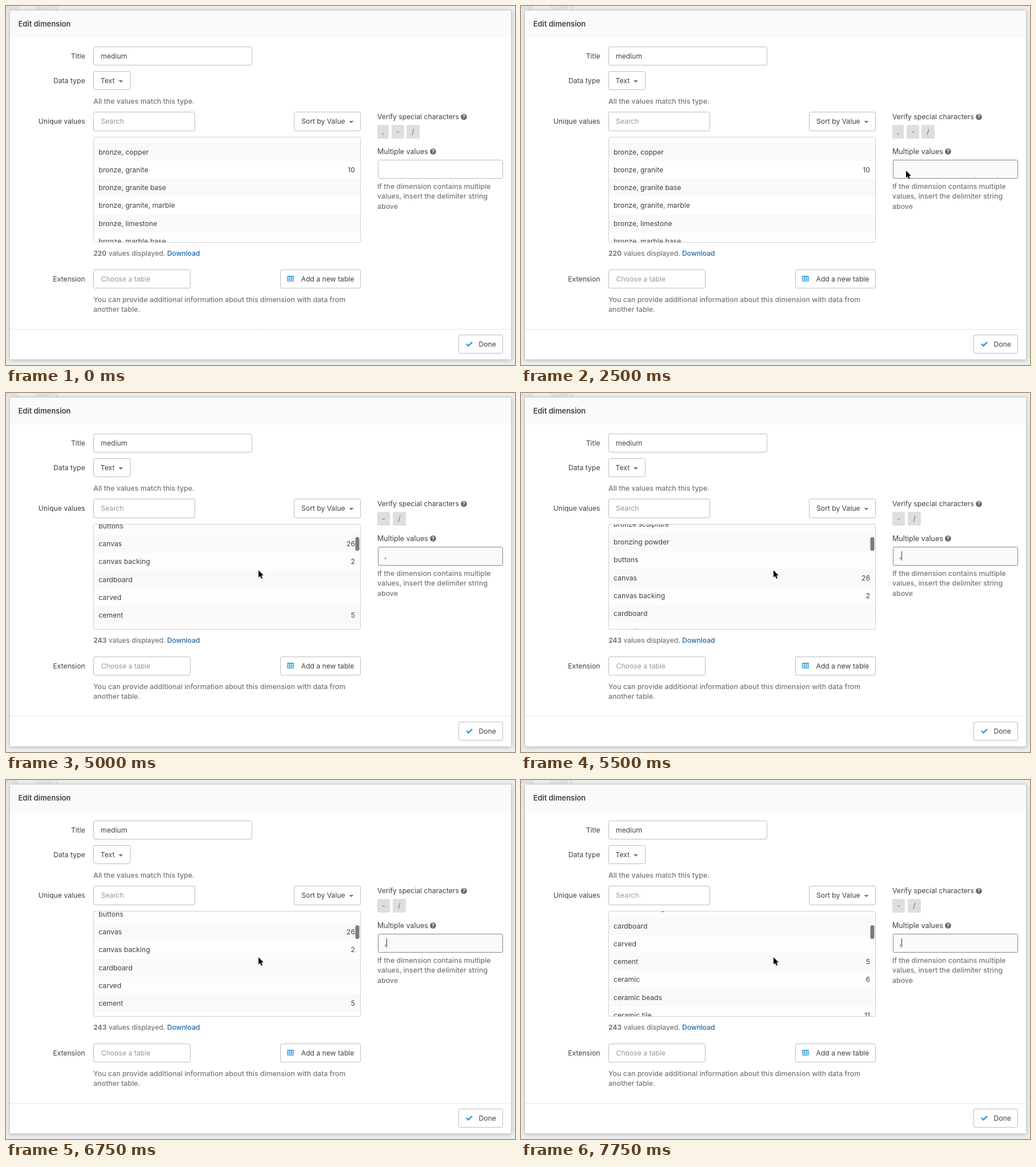
Write an HTML page with a canvas that moves like this. It is 891 px wide and 628 px high and loops after 8000 ms.

```html
<!DOCTYPE html>
<html lang="en">
<head>
<meta charset="utf-8">
<title>Edit dimension</title>
<style>
html, body { margin: 0; width: 100%; height: 100%; overflow: hidden; background: #ededed; }
canvas { display: block; }
</style>
</head>
<body>
<canvas id="stage" width="891" height="628"></canvas>
<script>
const ctx = document.getElementById('stage').getContext('2d');
const LOOP = 8000, TICK = 250, ROW = 31.25;
const INK = '#414141', HINT = '#999', LINE = '#bdbdbd', BLUE = '#3c9fdb';
const NOTE = { color: '#777', weight: 500, size: 12.35 };

const before = [['bronze, cast'], ['bronze, copper'], ['bronze, granite', '10'],
  ['bronze, granite base'], ['bronze, granite, marble'], ['bronze, limestone'],
  ['bronze, marble base']];
const after = [['bronze sculpture'], ['bronzing powder'], ['buttons'], ['canvas', '26'],
  ['canvas backing', '2'], ['cardboard'], ['carved'], ['cement', '5'],
  ['ceramic', '6'], ['ceramic beads'], ['ceramic tile', '11']];

// Keys are [time, ...values], joined by straight lines
const pointer = [[250, 693, 155], [500, 690, 336], [750, 684, 310], [1000, 684, 292],
  [1500, 684, 290], [1750, 678, 289], [2000, 674, 288], [3750, 674, 288],
  [4000, 610, 294], [4250, 500, 306], [4500, 442, 310]];
const scroll = [[4750, 236], [5000, 264], [5250, 302], [5500, 323.7], [6000, 326],
  [6250, 322], [6750, 266], [7250, 206.8], [7500, 197], [7750, 193]];

function at(keys, t) {
  if (t <= keys[0][0]) return keys[0].slice(1);
  for (let i = 1; i < keys.length; i++) {
    const a = keys[i - 1], b = keys[i];
    if (t <= b[0]) {
      const p = (t - a[0]) / (b[0] - a[0]);
      return a.slice(1).map((v, n) => v + (b[n + 1] - v) * p);
    }
  }
  return keys[keys.length - 1].slice(1);
}

function text(s, x, y, { color = INK, size = 12.2, weight = 400, align = 'left' } = {}) {
  ctx.font = `${weight} ${size}px Inter, Roboto, sans-serif`;
  ctx.fillStyle = color;
  ctx.textAlign = align;
  ctx.fillText(s, x, y);
  return x + ctx.measureText(s).width;
}

function fill(color, x, y, w, h, r = 0) {
  ctx.fillStyle = color;
  ctx.beginPath();
  ctx.roundRect(x, y, w, h, r);
  ctx.fill();
}

function box(x, y, w, h, line = LINE, back = '#fff') {
  fill(back, x, y, w, h, 2);
  ctx.strokeStyle = line;
  ctx.lineWidth = 1;
  ctx.beginPath();
  ctx.roundRect(x + .5, y + .5, w - 1, h - 1, 2);
  ctx.stroke();
}

function poly(points, color) {
  ctx.beginPath();
  points.forEach(([x, y]) => ctx.lineTo(x, y));
  ctx.closePath();
  ctx.fillStyle = color;
  ctx.fill();
}

const arrow = (x, y) => poly([[x - 4, y - 2], [x + 4, y - 2], [x, y + 2]], '#777');

function help(x, y) {
  ctx.beginPath();
  ctx.arc(x, y, 5.3, 0, 7);
  ctx.fillStyle = '#666';
  ctx.fill();
  text('?', x, y + 3.4, { color: '#fff', size: 9, weight: 700, align: 'center' });
}

function chip(s, x, w) {
  fill('#dedede', x, 208, w, 24, 2);
  text(s, x + w / 2, 224, { color: '#666', align: 'center' });
}

function backdrop() {
  fill('#ededed', 0, 0, 891, 628);
  text('Table', 22, 6, { color: '#cfcfcf', align: 'right' });
  text('Gallery', 51, 6, { color: '#cfcfcf' });
  ctx.save();
  ctx.shadowColor = 'rgba(0,0,0,.28)';
  ctx.shadowBlur = 7;
  ctx.shadowOffsetY = 1;
  fill('#fff', 7, 8, 877, 610);
  ctx.restore();
  ctx.strokeStyle = '#d0d0d0';
  ctx.lineWidth = 1;
  ctx.strokeRect(6.5, 7.5, 878, 611);
  fill('#fafafa', 7, 8, 877, 48);
  ctx.setLineDash([1, 1]);
  ctx.strokeStyle = '#ccc';
  ctx.beginPath();
  ctx.moveTo(7, 565.5);
  ctx.lineTo(884, 565.5);
  ctx.stroke();
  ctx.setLineDash([]);
}

function form(typed) {
  text('Edit dimension', 21.5, 36, { size: 12.9, weight: 600 });
  [['Title', 92], ['Data type', 135], ['Unique values', 206], ['Extension', 482]]
    .forEach(([s, y]) => text(s, 138.5, y, { align: 'right' }));

  box(153, 71, 278, 33);
  text('medium', 166, 92);
  box(153, 114, 65, 33);
  text('Text', 165.5, 135);
  arrow(201, 132);
  text('All the values match this type.', 153, 171, NOTE);
  box(153, 185, 178, 34);
  text('Search', 166, 206, { color: HINT });
  box(504, 185, 117, 34);
  text('Sort by Value', 517, 206);
  arrow(604.5, 203);

  const count = { ...NOTE, size: 12 };
  let x = text(typed ? '243' : '220', 153, 437, { ...count, weight: 700 });
  x = text(' values displayed. ', x, 437, count);
  text('Download', x, 437, { ...count, color: '#1c69aa' });

  box(153, 461, 170, 33);
  text('Choose a table', 166.5, 482, { color: HINT });
  box(480, 461, 141, 33);
  fill(BLUE, 492, 472, 12, 10, 1);
  for (let i = 0; i < 9; i++)
    fill('#e6f3fb', 493 + i % 3 * 3.7, 474 + Math.floor(i / 3) * 2.6, 2.7, 1.7);
  text('Add a new table', 516.5, 482);
  text('You can provide additional information about this dimension with data from', 153, 518, NOTE);
  text('another table.', 153, 535, NOTE);

  box(792, 575, 78, 33);
  ctx.strokeStyle = BLUE;
  ctx.lineWidth = 2.6;
  ctx.beginPath();
  ctx.moveTo(806, 591);
  ctx.lineTo(809.5, 594.5);
  ctx.lineTo(816, 588);
  ctx.stroke();
  text('Done', 827.5, 596);
}

function side(t, typed) {
  text('Verify special characters', 650, 198);
  help(801.5, 194);
  if (!typed) chip(',', 650, 20);
  chip('-', typed ? 650 : 675, 22);
  chip('/', typed ? 677 : 701, 23);
  text('Multiple values', 650, 259, { size: 12.5 });
  help(747.5, 254.5);
  const focus = t >= 1750;
  box(651, 269, 219, 33, focus ? '#858585' : LINE, focus ? '#fafafa' : '#fff');
  if (typed) text(',', 662.5, 289);
  if (focus && (t < 2000 || Math.floor(t / 500) % 2 === (typed ? 1 : 0)))
    fill('#333', typed ? 666 : 663, 277, 1, 16);
  ['If the dimension contains multiple', 'values, insert the delimiter string', 'above']
    .forEach((s, i) => text(s, 650, 319.5 + i * 17.5, NOTE));
}

function list(t, typed) {
  box(153, 229, 468, 185, '#cfcfcf', typed ? '#fdfdfd' : '#fff');
  ctx.save();
  ctx.beginPath();
  ctx.rect(154, 230, 466, 183);
  ctx.clip();
  const rows = typed ? after : before;
  const top = typed ? at(scroll, t)[0] - 3 * ROW : 224.3;
  rows.forEach(([name, count], i) => {
    const y = top + i * ROW;
    if (i % 2) fill('#f9f9f9', 154, Math.round(y - ROW / 2), 466, 31);
    const base = Math.round(y + 4);
    text(name, 162, base);
    if (count) text(count, 611, base, { align: 'right' });
  });
  if (t >= 5000) fill('#7b7b7b', 611.5, t < 6750 ? 252 : 254, 7, 24, 3.5);
  ctx.restore();
}

function cursor(t) {
  if (t < 250) return;
  const [x, y] = at(pointer, t).map(Math.round);
  const shape = [[0, 0], [0, 12.5], [2.8, 10], [4.8, 14.6], [7, 13.7], [5, 9.2], [8.8, 9]]
    .map(([a, b]) => [x + a, y + b]);
  ctx.save();
  ctx.shadowColor = 'rgba(0,0,0,.3)';
  ctx.shadowBlur = 2;
  ctx.shadowOffsetY = 1;
  poly(shape, '#000');
  ctx.restore();
  ctx.strokeStyle = '#fff';
  ctx.lineWidth = 1.6;
  ctx.stroke();
  poly(shape, '#000');
}

function draw(now) {
  const t = Math.floor(now % LOOP / TICK) * TICK;
  const typed = t >= 3500;
  backdrop();
  form(typed);
  side(t, typed);
  list(t, typed);
  cursor(t);
  requestAnimationFrame(draw);
}
requestAnimationFrame(draw);
</script>
</body>
</html>
```
